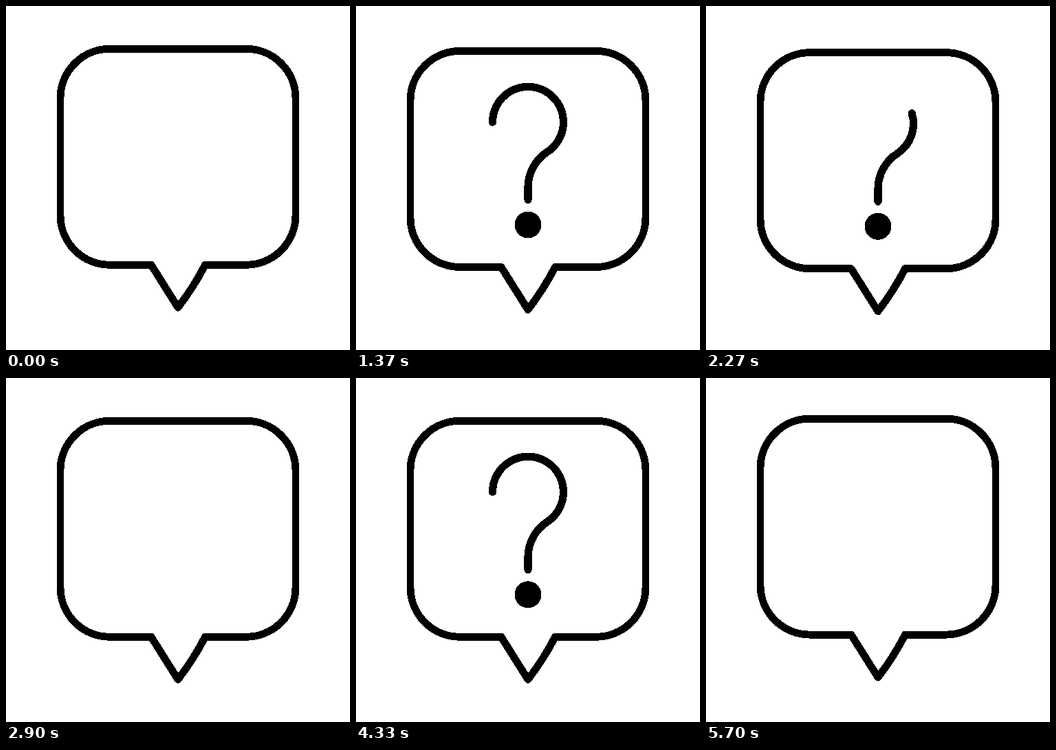
Animation, 500 px wide and 500 px high, one loop 5.73 s. Source, as an HTML page:

```html
<!DOCTYPE html>
<html lang="en">
<head>
<meta charset="utf-8">
<title>Question bubble</title>
<style>
  html, body { margin: 0; width: 100%; height: 100%; overflow: hidden; background: #fff; }
  svg { display: block; width: 100%; height: 100%; shape-rendering: crispEdges; }
  path { fill: none; stroke: #000; stroke-width: 10.9; stroke-linecap: round; stroke-linejoin: round; }
  #hook { stroke-width: 11.2; }
</style>
</head>
<body>
<svg viewBox="0 0 500 500">
  <g id="bubble">
    <path d="M151 376 A72 72 0 0 1 79 304 V134 A72 72 0 0 1 151 62 H349 A72 72 0 0 1 421 134 V304 A72 72 0 0 1 349 376 H289.5 Q273 408 250 438 L211 376 Z"/>
    <path id="hook" pathLength="1" d="M198.5 165.5 A51.5 51.5 0 1 1 278 208.7 A61.7 61.7 0 0 0 250 260 V278.5"/>
    <circle id="dot" cx="250" cy="314.6" r="19.5"/>
  </g>
</svg>
<script>
  const LOOP = 5730, STEPS = 72, BOB = 12, CYCLE = 36;
  const REST = 0.25, SWING = 6.3, RADIUS = 19.5;
  const [bubble, hook, dot] = ['bubble', 'hook', 'dot'].map(id => document.getElementById(id));

  // Poses advance every 80 ms, shown on a 30 fps clock.
  const starts = Array.from({ length: STEPS }, (_, i) =>
    Math.round(Math.ceil(i * 12 / 5) * 10 / 3) * 10);

  const ease = u => u * u * (3 - 2 * u);

  // Eased value from [step, value] keys.
  function tween(keys, s) {
    if (s <= keys[0][0]) return keys[0][1];
    for (let k = 1; k < keys.length; k++) {
      const [s0, v0] = keys[k - 1], [s1, v1] = keys[k];
      if (s <= s1) return v0 + (v1 - v0) * ease((s - s0) / (s1 - s0));
    }
    return keys[keys.length - 1][1];
  }

  const HEAD = [[1, 0], [10, 1]];
  const TAIL = [[25, 0], [31, 1]];
  const DOT = [[6, 0], [10, 1.06], [13, 1], [28, 1], [32, 0]];

  function pose(step) {
    const s = step % CYCLE;
    const dy = REST + SWING * Math.sin(step / BOB * 2 * Math.PI);
    bubble.setAttribute('transform', `translate(0 ${dy.toFixed(2)})`);

    const from = tween(TAIL, s), length = tween(HEAD, s) - from;
    hook.style.visibility = length > 0.001 ? 'visible' : 'hidden';
    hook.style.strokeDasharray = `${length} 2`;
    hook.style.strokeDashoffset = -from;

    dot.setAttribute('r', RADIUS * tween(DOT, s));
  }

  const origin = performance.now();
  let shown = -1;
  function tick() {
    const t = (performance.now() - origin) % LOOP;
    let step = STEPS - 1;
    while (starts[step] > t) step--;
    if (step !== shown) pose(shown = step);
    requestAnimationFrame(tick);
  }
  tick();
</script>
</body>
</html>
```
